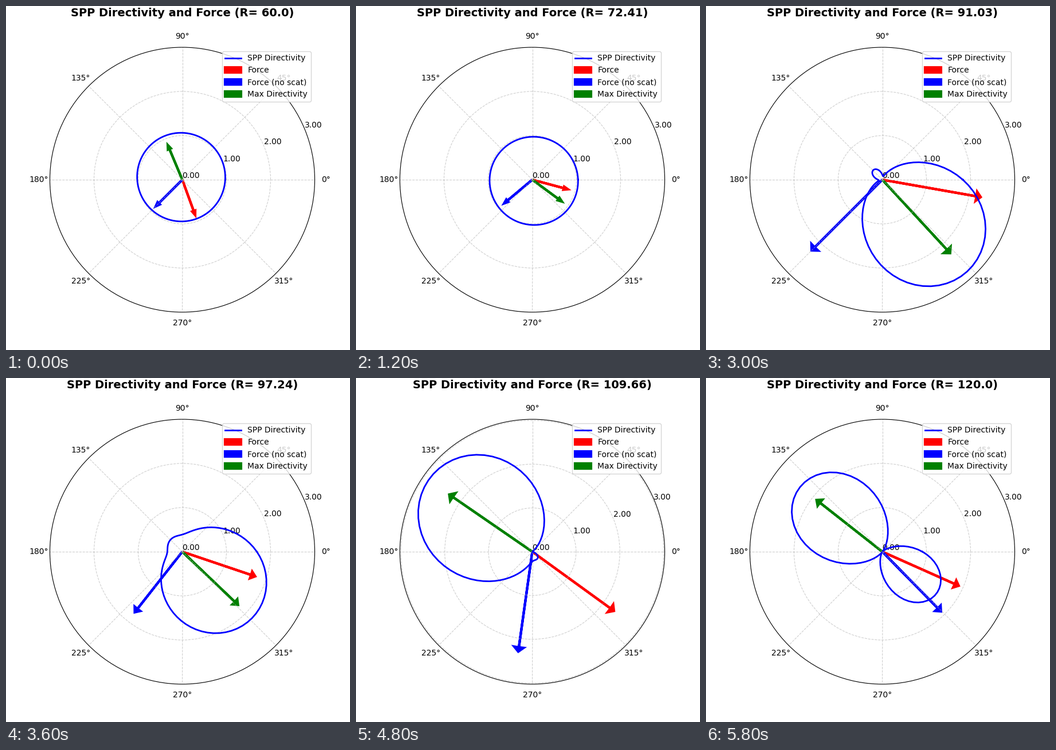
A matplotlib script that plays this animation: 600x600 px, repeating every 6000 ms.

```python
import numpy as np
import matplotlib.pyplot as plt
from matplotlib.animation import FuncAnimation

FRAMES, INTERVAL = 30, 200
steps = np.arange(FRAMES)
radii = np.linspace(60, 120, FRAMES)
theta = np.linspace(0, 2 * np.pi, 100)


def ease(keys, values):
    """Smoothstep between key points, sampled at every step."""
    index = np.arange(len(keys))
    k, u = np.divmod(np.interp(steps, keys, index), 1)
    return np.interp(k + u * u * (3 - 2 * u), index, values)


# The dipole term flips sign twice; its axis swings away around the second flip.
dipole = ease([0, 6, 11, 15.8, 24.1, 28.3], [.064, -.043, .158, -1.38, 1.38, .41])
quad = ease([9, 15.5, 20, 28], [.005, .575, .07, .96])
quad_axis = np.interp(steps, [0, 6, 15, 22, 29], [113, 143, 133, 141, 142])
dipole_axis = quad_axis + 17 * np.exp(-((steps - 22) / 2.75) ** 2)

force = np.interp(steps, [0, 6, 11, 15, 24.3, 29], [-70, -15, 7, -10, -36.8, -24])
bare = np.interp(steps, [0, 6, 11, 15, 22, 29], [225, 220, 232.5, 225, 241, 314.5])
bare[9:13] -= 180


def directivity(i):
    return (1 + dipole[i] * np.cos(theta - np.radians(dipole_axis[i]))
            + quad[i] * np.cos(2 * (theta - np.radians(quad_axis[i]))))


fig = plt.figure(figsize=(6, 6), dpi=100)
ax = fig.add_subplot(projection="polar")


def arrow(angle, length, color, label):
    ax.arrow(angle, 0, 0, length, color=color, label=label, lw=3,
             head_width=0.1, head_length=0.1, length_includes_head=True)


def update(i):
    ax.clear()
    gain = directivity(i)
    peak = gain.max()
    ax.plot(theta, gain, color="blue", lw=2, label="SPP Directivity")

    length = 0.8 * peak
    arrow(np.radians(force[i]), length, "red", "Force")
    arrow(np.radians(bare[i]), length, "blue", "Force (no scat)")
    arrow(theta[gain.argmax()], length, "green", "Max Directivity")

    ax.set_yticks([0, 1, 2, 3])
    ax.yaxis.set_major_formatter("{x:.2f}")
    ax.set_ylim(0, max(3, 1.05 * peak))
    ax.grid(True, linestyle="--", alpha=0.6)
    ax.set_title(f"SPP Directivity and Force (R= {round(float(radii[i]), 2)})",
                 fontsize=14, fontweight="bold", pad=20)
    ax.legend(loc="upper right", fontsize=10)


anim = FuncAnimation(fig, update, frames=FRAMES, interval=INTERVAL,
                     repeat=True, repeat_delay=0)
plt.show()
```
